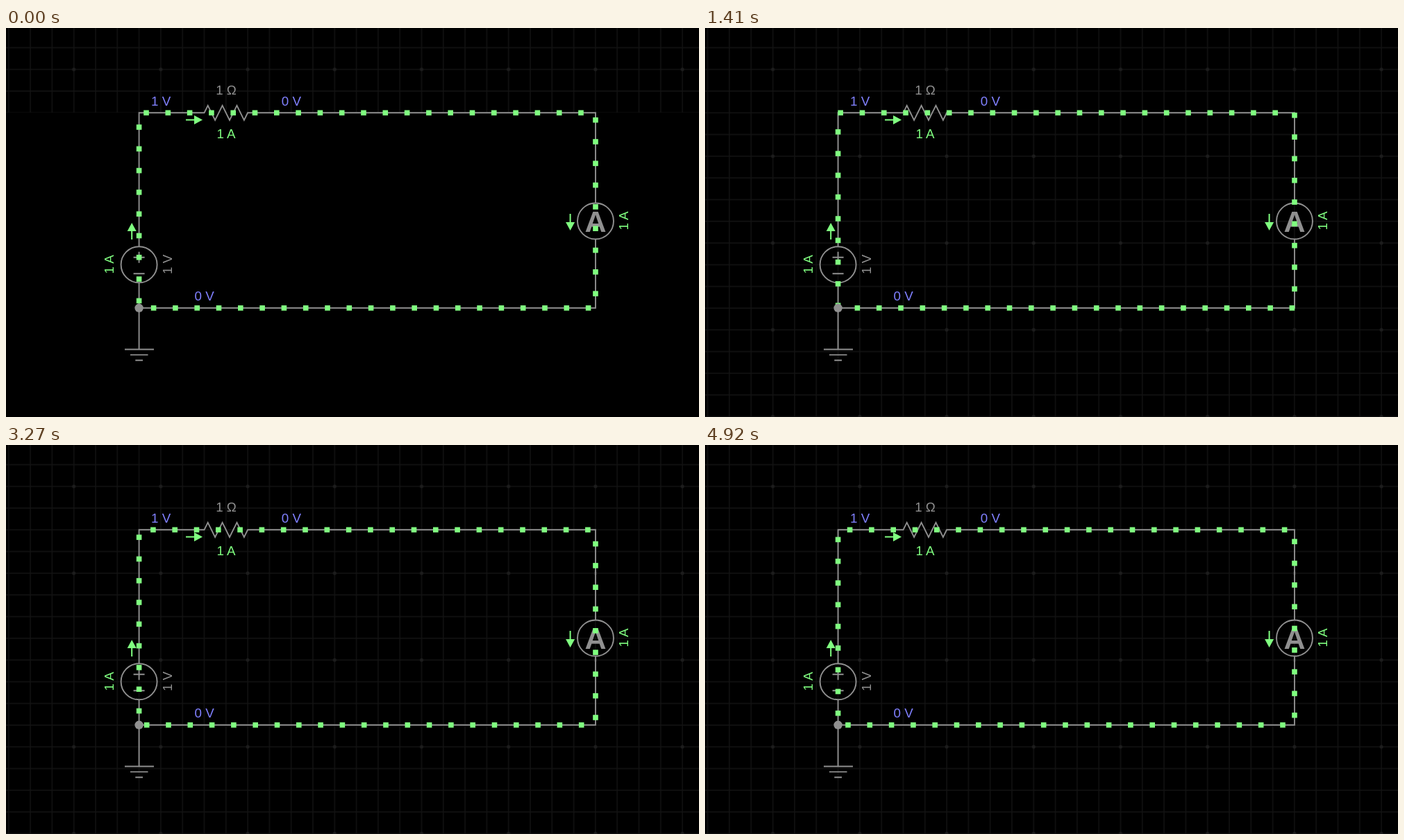
An HTML page that plays this animation: 998x561 px, repeating every 4.95 s.

```html
<!DOCTYPE html>
<html lang="en">
<head>
<meta charset="utf-8">
<title>Circuit simulation</title>
<style>
  html, body { margin: 0; width: 100%; height: 100%; overflow: hidden; background: #000; }
  svg { display: block; width: 998px; height: 561px; }
  text { font: 18.8px "Liberation Sans", Arial, sans-serif; text-anchor: middle; fill: #909090; }
  .wire { fill: none; stroke: #909090; stroke-width: 1.9; }
  .volt { fill: #8080ff; }
  .amp { fill: #80ff80; }
  .meter { font-size: 43px; font-weight: bold; }
  .arrow { fill: #80ff80; stroke: none; }
</style>
</head>
<body>
<svg viewBox="0 0 998 561">
  <defs>
    <pattern id="cell" x="-11.85" y="12.75" width="31.3" height="31.3" patternUnits="userSpaceOnUse">
      <path d="M15.65 0V31.3M0 15.65H31.3" stroke="#131313" stroke-width="1.4"/>
    </pattern>
    <pattern id="major" x="35.1" y="-2.9" width="125.2" height="125.2" patternUnits="userSpaceOnUse">
      <circle cx="62.6" cy="62.6" r="2.5" fill="#1d1d1d"/>
    </pattern>
    <path id="arrow" class="arrow" d="M-24 -1H-12V-6.5L0 0L-12 6.5V1H-24Z"/>
  </defs>

  <g id="upper">
    <rect width="998" height="122" fill="url(#cell)"/>
    <rect width="998" height="122" fill="url(#major)"/>
  </g>
  <g id="lower">
    <rect y="122" width="998" height="439" fill="url(#cell)"/>
    <rect y="122" width="998" height="439" fill="url(#major)"/>
  </g>

  <g class="wire">
    <path d="M191.6 315.2V122.3H285.5l5.2 -10.5l10.4 21l10.5 -21l10.4 21l10.5 -21l10.4 21l5.2 -10.5H849V252.5"/>
    <path d="M849 304.5V403.8H191.6V367.2M191.6 403.8V463.5"/>
    <path d="M171 463.5H213M179 471.4H204.5M186.3 479.2H197"/>
    <circle cx="191.6" cy="341.2" r="26"/>
    <circle cx="849" cy="278.5" r="26"/>
    <path d="M183.6 330.8H199.6M191.6 322.8V338.8M183.6 354.2H199.6"/>
  </g>

  <text class="meter" x="849" y="294">A</text>
  <text x="317" y="96.3">1 Ω</text>
  <text class="volt" x="223.2" y="112">1 V</text>
  <text class="volt" x="410.9" y="112">0 V</text>
  <text class="volt" x="285.7" y="393.4">0 V</text>
  <text class="amp" x="317" y="159">1 A</text>
  <text class="amp" transform="translate(155 340.8) rotate(-90)">1 A</text>
  <text transform="translate(238.8 340.8) rotate(-90)">1 V</text>
  <text class="amp" transform="translate(896.3 278) rotate(-90)">1 A</text>

  <use href="#arrow" transform="translate(283 132.6)"/>
  <use href="#arrow" transform="translate(181.2 281) rotate(-90)"/>
  <use href="#arrow" transform="translate(812.6 292) rotate(90)"/>

  <g id="charges" fill="#80ff80"></g>
  <circle cx="191.6" cy="403.8" r="6.2" fill="#909090"/>
</svg>

<script>
const LOOP = 4950, TICK = 30, GAP = 31.3, SIZE = 7.6;
const ns = "http://www.w3.org/2000/svg";
const lower = document.getElementById("lower");
const charges = document.getElementById("charges");

// Start corner, direction and number of cells for each side, clockwise.
const sides = [
  [191.6, 122.3, 1, 0, 21],
  [849, 122.3, 0, 1, 9],
  [849, 403.8, -1, 0, 21],
  [191.6, 403.8, 0, -1, 9],
].map(([x, y, dx, dy, count]) => {
  const group = charges.appendChild(document.createElementNS(ns, "g"));
  for (let i = 0; i < count; i++) {
    const dot = group.appendChild(document.createElementNS(ns, "rect"));
    dot.setAttribute("x", x + dx * i * GAP - SIZE / 2);
    dot.setAttribute("y", y + dy * i * GAP - SIZE / 2);
    dot.setAttribute("width", SIZE);
    dot.setAttribute("height", SIZE);
  }
  return { group, dx, dy };
});

// Time in ms and distance travelled; the flow is slightly uneven.
const flow = [
  [0, 10.4], [780, 112.2], [2010, 266.8], [2790, 368.5],
  [3270, 427.2], [4230, 551.4], [4920, 643],
];

function travelled(t) {
  const i = Math.max(1, flow.findIndex(([time]) => time >= t));
  const [t0, d0] = flow[i - 1], [t1, d1] = flow[i];
  return d0 + (d1 - d0) * (t - t0) / (t1 - t0);
}

function draw() {
  const t = Math.floor(performance.now() % LOOP / TICK) * TICK;
  const shift = travelled(t) % GAP;
  for (const { group, dx, dy } of sides) {
    group.setAttribute("transform", `translate(${dx * shift} ${dy * shift})`);
  }
  lower.setAttribute("opacity", Math.min(1, t / 300));
  requestAnimationFrame(draw);
}
draw();
</script>
</body>
</html>
```
